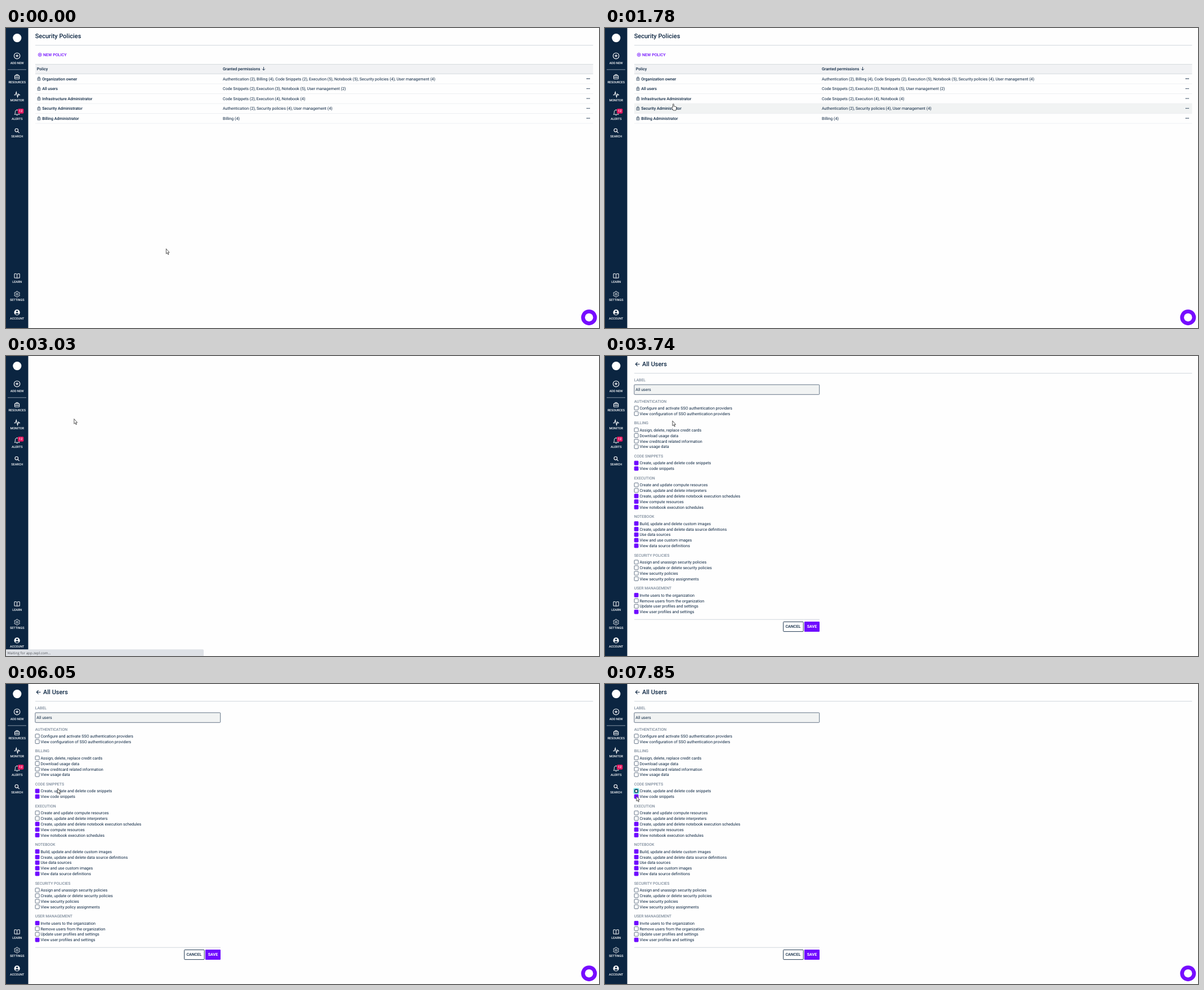
An HTML page that plays this animation: 1053x532 px, repeating every 8000 ms.

```html
<!DOCTYPE html>
<html lang="en">
<head>
<meta charset="utf-8">
<title>Security Policies</title>
<style>
html, body { margin: 0; width: 100%; height: 100%; overflow: hidden; background: #fff; }
svg { display: block; width: 1053px; height: 532px; }
text { font-family: Roboto, Arial, sans-serif; fill: #0b2541; text-rendering: geometricPrecision; white-space: pre; }
.m { font-weight: 500; }
.b { font-weight: 700; }
.side { font-weight: 500; fill: #fff; text-anchor: middle; }
.group { font-weight: 500; fill: #7d8b9b; }
.new { font-weight: 500; fill: #6f0aff; }
.white { font-weight: 700; fill: #fff; }
.status { font-family: "Open Sans", "Noto Sans", sans-serif; fill: #53565b; }
</style>
</head>
<body>
<svg id="stage" viewBox="0 0 1053 532"></svg>
<script>
const NAVY = '#0b2541', PURPLE = '#6f0aff', LOOP = 8000, STEP = 77.7;
const BODY = 7.13, ROW = 17.55, ROWS_TOP = 81.4;

const text = (x, mid, str, cls = '', size = BODY) =>
  `<text x="${x}" y="${mid + size * 0.355}" font-size="${size}" class="${cls}">${str}</text>`;
const rect = (x, y, w, h, fill, extra = '') =>
  `<rect x="${x}" y="${y}" width="${w}" height="${h}" fill="${fill}" ${extra}/>`;
const circle = (x, y, r, fill, extra = '') =>
  `<circle cx="${x}" cy="${y}" r="${r}" fill="${fill}" ${extra}/>`;
const line = (d, color = NAVY, width = 1) =>
  `<path d="${d}" fill="none" stroke="${color}" stroke-width="${width}"/>`;
const group = (id, body) => `<g id="${id}">${body}</g>`;
const plus = (x, y, r, color, width) =>
  circle(x, y, r, 'none', `stroke="${color}" stroke-width="${width}"`) +
  line(`M${x - r / 2} ${y}h${r}M${x} ${y - r / 2}v${r}`, color, width);

function gear(x, y) {
  const pts = Array.from({ length: 24 }, (_, i) => {
    const r = i % 4 < 2 ? 5.1 : 4.1, a = (i - 0.5) * Math.PI / 12;
    return `${x + r * Math.sin(a)},${y - r * Math.cos(a)}`;
  });
  return `<polygon points="${pts.join(' ')}" fill="none" stroke="#fff" stroke-width=".9"/>` +
    circle(x, y, 1.7, 'none', 'stroke="#fff" stroke-width=".9"');
}

function sidebar() {
  const labels = [['ADD NEW', 61.8], ['RESOURCES', 96.2], ['MONITOR', 128.2], ['ALERTS', 160.8],
    ['SEARCH', 191.6], ['LEARN', 450.2], ['SETTINGS', 482.4], ['ACCOUNT', 514.6]];
  return rect(0, 0, 39.5, 532, NAVY) +
    circle(19.8, 17.6, 7.6, '#fff') +
    plus(19.6, 49.4, 5.2, '#fff', 1.1) +
    line('M3 73.8H36', '#8794a4', 1) +
    line('M15.5 84.4h8.2v5.8h-8.2zM17.8 84.4v-1.8h3.6v1.8M15.5 87.3h8.2M19.6 86.5v1.7', '#fff', 1) +
    line('M14.6 118.6h2.1l1.6-5 2.2 8.8 1.7-5.6 1 1.8h1.8', '#fff', 1.1) +
    line('M15 153.2h9.2l-1.3-1.7v-2.7a3.3 3.3 0 0 0-6.6 0v2.7zM18.6 154.8h2M19.6 145.5v-1.2', '#fff', 0.9) +
    rect(21.1, 143, 10.3, 8.8, '#e3175f', 'rx="1.8"') +
    text(26.2, 147.3, '12', 'side', 5.5) +
    circle(18.8, 181.3, 2.8, 'none', 'stroke="#fff" stroke-width="1.1"') +
    line('M20.9 183.4l2.7 2.7', '#fff', 1.2) +
    line('M19.6 436.4v7.2M15 435.8h3.2l1.4.9 1.4-.9h3.2v7.4h-3.4l-1.2.8-1.2-.8H15z', '#fff', 1) +
    gear(19.6, 472) +
    circle(19.6, 504.4, 5.1, '#fff') + circle(19.6, 502.7, 1.6, NAVY) +
    `<path d="M16.4 506.9q3.2-2.8 6.4 0-3.2 3-6.4 0z" fill="${NAVY}"/>` +
    labels.map(([s, y]) => text(19.7, y, s, 'side', 5.484)).join('');
}

function listPage() {
  const rows = [
    ['Organization owner', 'Authentication (2), Billing (4), Code Snippets (2), Execution (5), Notebook (5), Security policies (4), User management (4)'],
    ['All users', 'Code Snippets (2), Execution (3), Notebook (5), User management (2)'],
    ['Infrastructure Administrator', 'Code Snippets (2), Execution (4), Notebook (4)'],
    ['Security Administrator', 'Authentication (2), Security policies (4), User management (4)'],
    ['Billing Administrator', 'Billing (4)']];
  const lock = y => `<g transform="translate(54.5 ${y - 4.1}) scale(.33)">` +
    line('M5 9h14v12H5zM8 9V6a4 4 0 0 1 8 0v3', NAVY, 2.2) + circle(12, 15, 2, NAVY) + '</g>';
  const row = ([name, perms], i) => {
    const y = ROWS_TOP + ROW * (i + 0.5) - 0.1;
    return line(`M52 ${ROWS_TOP + ROW * (i + 1)}H1042.5`, '#e6e9ec', 0.7) + lock(y) +
      text(64.2, y, name, 'm') + text(385, y, perms) +
      [1031.7, 1033.9, 1036.1].map(x => circle(x, y - 0.2, 0.8, NAVY)).join('');
  };
  return text(51.7, 14.5, 'Security Policies', 'm', 10.97) +
    plus(60.2, 47.4, 2.9, PURPLE, 0.9) + text(66, 47.5, 'NEW POLICY', 'new') +
    rect(52, 64.3, 990.5, 17, '#f1f2f4') +
    line('M52 64.4H1042.5M52 81.3H1042.5', '#cdd3d9', 0.8) +
    text(54.8, 72.3, 'Policy', 'm') + text(385, 72.3, 'Granted permissions', 'm') +
    line('M457.5 69.2v5.6M455 72.5l2.5 2.5 2.5-2.5', NAVY, 0.9) +
    rect(52, 0, 990.5, ROW - 0.7, '#f1f3f3', 'id="hover"') +
    rows.map(row).join('');
}

function formPage() {
  // A leading asterisk marks a ticked permission.
  const groups = [
    ['AUTHENTICATION', 'Configure and activate SSO authentication providers', 'View configuration of SSO authentication providers'],
    ['BILLING', 'Assign, delete, replace credit cards', 'Download usage data', 'View creditcard related information', 'View usage data'],
    ['CODE SNIPPETS', '*Create, update and delete code snippets', '*View code snippets'],
    ['EXECUTION', 'Create and update compute resources', 'Create, update and delete interpreters',
      '*Create, update and delete notebook execution schedules', '*View compute resources', '*View notebook execution schedules'],
    ['NOTEBOOK', '*Build, update and delete custom images', '*Create, update and delete data source definitions',
      '*Use data sources', '*View and use custom images', '*View data source definitions'],
    ['SECURITY POLICIES', 'Assign and unassign security policies', 'Create, update or delete security policies',
      'View security policies', 'View security policy assignments'],
    ['USER MANAGEMENT', '*Invite users to the organization', 'Remove users from the organization',
      'Update user profiles and settings', '*View user profiles and settings']];
  let y = 80.2, out = '';
  for (const [title, ...items] of groups) {
    out += text(51.7, y, title, 'group', 6.9);
    y += 12.2;
    for (const item of items) {
      const on = item[0] === '*';
      out += rect(52.1, y - 3.6, 7, 7, on ? PURPLE : '#fff',
        `rx="1" stroke="${on ? PURPLE : '#3d5067'}" stroke-width=".8"`) +
        text(61.4, y, on ? item.slice(1) : item);
      y += 9.87;
    }
    y += 6.9;
  }
  return line('M61.6 14.5h-7M57.6 11.2l-3.3 3.3 3.3 3.3', NAVY, 1.1) +
    text(66, 14.5, 'All Users', 'm', 10.97) +
    text(51.7, 43, 'LABEL', 'group', 6.9) +
    rect(51.9, 50.9, 328.8, 17.4, '#f1f3f3', 'rx="1" stroke="#54657a" stroke-width=".9"') +
    text(54.3, 59.7, 'All users') + out +
    line('M52 467.2H381', '#ccd3da', 0.9) +
    rect(316.6, 471.4, 35.6, 17.2, '#fff', `rx="1" stroke="${NAVY}" stroke-width=".9"`) +
    text(320.4, 479.8, 'CANCEL', 'm') +
    rect(354, 471, 27, 18, PURPLE, 'rx="1"') + text(358.7, 479.8, 'SAVE', 'white');
}

const focusBox = rect(49.6, 183.9, 11.8, 11.8, '#5fd6dc', 'rx="3" opacity=".25"') +
  rect(51, 185.2, 9.2, 9.2, '#5fd6dc', 'rx="1.8"') +
  rect(53, 187.2, 5.2, 5.2, '#fff', `rx="1.6" stroke="${NAVY}" stroke-width="1.4"`);

const status = rect(-1, 520.3, 352, 13, '#dee1e6', 'rx="2"') +
  text(2.2, 526.7, 'Waiting for app.zepl.com...', 'status', 6.25);

const pointerStyle = 'fill="#fff" stroke="#222" stroke-width=".75" stroke-linejoin="round"';
const arrow = `<path id="arrow" ${pointerStyle} d="M.4.5V9.3L2.3 7.5 3.8 10.8 5 10.2 3.6 7.1H6.1z"/>`;
const hand = `<path id="hand" ${pointerStyle} d="M-.9 6.6V1.2a.9.9 0 0 1 1.8 0V4.6L4.5 5.3Q5.6 5.6 5.5 6.8L5.1 9.5 4.5 11.8H-.3L-1.2 9.8-3 7.3Q-3.2 6.2-2.1 6.1z"/>`;

document.getElementById('stage').innerHTML =
  rect(0, 0, 1053, 532, '#fefefe') +
  group('rule', line('M52 30.6H1042.5', '#ccd3da', 0.9)) +
  group('list', listPage()) + group('form', formPage()) + group('focus', focusBox) +
  group('chat', circle(1035.3, 513.2, 14, '#760cff') + circle(1035.3, 513.2, 7.2, '#fff')) +
  sidebar() + group('status', status) + group('cursor', arrow + hand);

const el = {};
for (const id of ['rule', 'list', 'form', 'focus', 'chat', 'status', 'cursor', 'arrow', 'hand', 'hover'])
  el[id] = document.getElementById(id);

// Pointer path: time, x, y
const path = [
  [0, 284, 391], [860, 168, 321], [1093, 168, 321], [1940, 117, 116.7], [2240, 120.5, 112],
  [2415, 120.5, 112], [2480, 120.5, 111], [3660, 120.5, 111], [3885, 116, 126], [4130, 116, 126],
  [4500, 107.5, 134], [4680, 107.5, 134], [5510, 99.5, 163], [6050, 91, 185.7], [6360, 87.5, 190],
  [6390, 87.5, 190], [7140, 57, 190], [7480, 57, 190], [7700, 58.5, 194], [7840, 55.4, 198.3]];

function pointer(t) {
  const i = path.findIndex(p => p[0] > t);
  if (i < 0) return path[path.length - 1].slice(1);
  const [t0, x0, y0] = path[i - 1], [t1, x1, y1] = path[i];
  const u = (t - t0) / (t1 - t0), e = u * u * (3 - 2 * u);
  return [x0 + (x1 - x0) * e, y0 + (y1 - y0) * e];
}

const show = (node, on) => node.setAttribute('visibility', on ? 'inherit' : 'hidden');

function draw(t) {
  const [x, y] = pointer(Math.floor((t + 8) / STEP) * STEP);
  const list = t < 2870, form = t >= 3265;
  const row = Math.floor((y - ROWS_TOP) / ROW), over = list && row >= 0 && row < 5;
  show(el.list, list);
  show(el.form, form);
  show(el.rule, list || form);
  show(el.focus, t >= 7305);
  show(el.chat, list || t >= 4055);
  show(el.status, t >= 2715 && t < 3340);
  show(el.hover, over);
  show(el.hand, over);
  show(el.arrow, !over);
  el.hover.setAttribute('y', ROWS_TOP + ROW * row + 0.35);
  el.cursor.setAttribute('transform', `translate(${x} ${y})`);
}

function tick() {
  draw(performance.now() % LOOP);
  requestAnimationFrame(tick);
}
tick();
</script>
</body>
</html>
```
